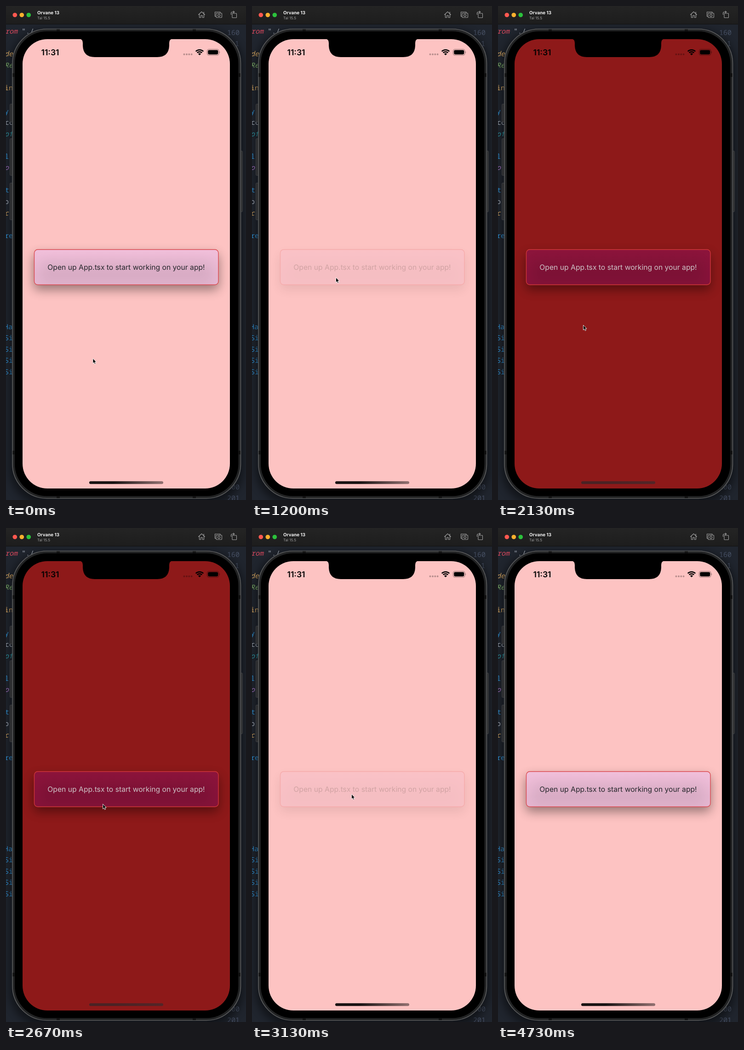
Recreate the animation shown at these times as an HTML page. Size 522 by 1073 pixels, loop 4.79 s.

```html
<!DOCTYPE html>
<html lang="en">
<head>
<meta charset="utf-8">
<title>Theme toggle</title>
<style>
html, body { margin: 0; height: 100%; overflow: hidden; background: #1e222a; }
svg {
  display: block; width: 100%; height: 100%;
  font-family: Inter, "Open Sans", sans-serif; text-rendering: geometricPrecision;
  --bg: #fdc3c2; --top: #f1bfda; --low: #e5b6d0; --tint: .05;
  --edge: #dc4a50; --ink: #25262b; --bar1: #181212; --bar2: #8f6e6e;
}
svg.dark {
  --bg: #8e1919; --top: #8c143b; --low: #87133a; --tint: .07;
  --edge: #d2363a; --ink: #cfc4c8; --bar1: #4a2224; --bar2: #532527;
}
#code { font: 15px "Noto Sans Mono", "DejaVu Sans Mono", monospace; }
.i { font-style: italic; }
.line { fill: none; stroke: #a2a2a2; stroke-width: 1.1; stroke-linejoin: round; stroke-linecap: round; }
</style>
</head>
<body>
<svg id="stage" viewBox="0 0 522 1073" preserveAspectRatio="none">
  <defs>
    <filter id="soft" x="-20%" y="-80%" width="140%" height="260%"><feGaussianBlur stdDeviation="11.6"/></filter>
    <filter id="glow" x="-10%" y="-10%" width="120%" height="120%"><feGaussianBlur stdDeviation="9"/></filter>
    <clipPath id="inside"><rect x="61" y="529" width="401" height="76.500" rx="8"/></clipPath>
    <linearGradient id="fill" x2="0" y2="1">
      <stop style="stop-color:var(--top)"/><stop offset=".7" style="stop-color:var(--low)"/>
    </linearGradient>
    <linearGradient id="bar" x2="1" y2=".04">
      <stop offset=".35" style="stop-color:var(--bar1)"/><stop offset="1" style="stop-color:var(--bar2)"/>
    </linearGradient>
    <linearGradient id="head" x2="0" y2="1">
      <stop stop-color="#242424"/><stop offset="1" stop-color="#1d1d1d"/>
    </linearGradient>
  </defs>

  <rect width="522" height="1073" fill="#20252e"/>
  <g id="code"></g>
  <rect x="8" y="52" width="508" height="1030" rx="76" opacity=".45" filter="url(#glow)"/>

  <!-- title bar -->
  <rect width="522" height="40" fill="url(#head)"/>
  <path d="M0 39.500H522" stroke="#111"/>
  <circle cx="19.300" cy="19.500" r="4.800" fill="#fe5850"/>
  <circle cx="34.300" cy="19.500" r="4.800" fill="#fbb02e"/>
  <circle cx="49.300" cy="19.500" r="4.800" fill="#2bc13c"/>
  <text x="68" y="18" font-size="9.800" font-weight="700" fill="#f2f2f2">Orvane 13</text>
  <text x="68" y="28.700" font-size="8" fill="#a0a0a0">Tal 15.5</text>
  <g class="line">
    <path d="M418.500 19L425.500 12.500L432.500 19M420.500 18V25H423.800V20.500H427.200V25H430.500V18M430.300 16V13"/>
    <path d="M456.500 22.500H454.500V13H466V15"/>
    <rect x="457" y="15.500" width="12.500" height="9.500" rx="1"/>
    <circle cx="463.200" cy="20.300" r="2.500"/>
    <rect x="492" y="16" width="9.500" height="9.500" rx=".8"/>
    <path d="M489.500 18.500V16Q489.500 13 492.500 13H496.500M494.500 11L496.700 13L494.500 15"/>
  </g>

  <!-- device -->
  <g fill="#2a2b2d" stroke="#45464a" stroke-width=".8">
    <rect x="8.500" y="213" width="8" height="39" rx="1.500"/>
    <rect x="8.500" y="288" width="8" height="80" rx="1.500"/>
    <rect x="8.500" y="384.500" width="8" height="80" rx="1.500"/>
    <rect x="506" y="315" width="8.500" height="132" rx="1.500"/>
  </g>
  <rect x="14" y="50" width="496.500" height="1019.500" rx="75" fill="#222324" stroke="#5e5f60" stroke-width="1.600"/>
  <path d="M110 52.500h7M406 52.500h7M110 1067h7M406 1067h7M16.500 146v8M508 146v8M16.500 966v8M508 966v8" stroke="#111" stroke-width="4"/>
  <rect x="19" y="55" width="486.500" height="1009.500" rx="70"/>
  <rect x="36" y="72" width="451" height="976" rx="54" style="fill:var(--bg)"/>
  <path d="M158 71.500H160Q167 72 167 80V86Q168 111 193 111H329Q354 111 355 86V80Q355 72 362 71.500H364Z"/>

  <!-- status bar -->
  <text x="96" y="107" font-size="17.600" font-weight="600" text-anchor="middle">11:31</text>
  <path d="M387.500 105h.01M393 105h.01M398.300 105h.01M403.600 105h.01" stroke="#000" stroke-opacity=".27" stroke-width="4" stroke-linecap="round"/>
  <g fill="none" stroke="#000" stroke-width="2.500">
    <path d="M412.800 98.600A11.800 11.800 0 0 1 429.200 98.600M415.700 101.600A7.700 7.700 0 0 1 426.300 101.600"/>
  </g>
  <path d="M421 107L417.900 103.900A4.500 4.500 0 0 1 424.100 103.900Z"/>
  <rect x="437.500" y="94" width="25.500" height="13" rx="4" fill="none" stroke="#000" stroke-opacity=".42" stroke-width="1.100"/>
  <rect x="439.300" y="95.800" width="21.900" height="9.400" rx="2.400"/>
  <path d="M464.300 98.300Q466.300 100.500 464.300 102.700Z" opacity=".45"/>

  <!-- button -->
  <g id="card">
    <rect x="61" y="539.500" width="401" height="76.500" rx="8" opacity=".4" filter="url(#soft)"/>
    <rect x="61.500" y="529" width="400.500" height="76.500" rx="8" fill="url(#fill)"/>
    <g clip-path="url(#inside)">
      <rect x="76" y="551" width="371" height="54" rx="8" style="opacity:var(--tint)" filter="url(#soft)"/>
    </g>
    <rect x="61.500" y="529" width="400.500" height="76.500" rx="7.500" fill="none" stroke-width="1.400" style="stroke:var(--edge)"/>
    <text x="261.500" y="573" font-size="15.700" text-anchor="middle" style="fill:var(--ink)">Open up App.tsx to start working on your app!</text>
  </g>
  <rect x="181" y="1032.300" width="161" height="6" rx="3" fill="url(#bar)"/>

  <path id="cursor" d="M0 0V10.800L2.400 8.600L4 12.300L5.900 11.500L4.300 7.900H7.500Z" stroke="#fff" stroke-width=".9"/>
</svg>
<script>
const $ = id => document.getElementById(id);
const blue = '#2f8fd0', grey = '#a9b0bb', gold = '#d9a860', dim = '#475064';

// text, x, baseline, colour, italic
[
  ['rom', -2, 60, '#d8485c', 1], ['"./', 34, 60, grey],
  ['de', -3, 109, gold, 1], ['Re', -3, 134, '#7fb069', 1], ['in', -3, 183, gold],
  ['y', -3, 234, blue], ['co', -2, 258, grey], ['of', -3, 283, '#2d9aa6', 1],
  ['l', -3, 332, blue], ['o', -3, 356, '#a873c4', 1], ['t', -2, 405, blue],
  ['p', -3, 430, grey], ['c', -3, 455, gold, 1], ['re', -3, 504, blue], ['Ha', -4, 702, blue],
  ...[726, 751, 775, 800].map(y => ['Si', -3, y, blue]),
  ['160', 481, 63, dim], ['1', 498, 87, dim], ['200', 481, 1050, dim], ['201', 481, 1074, dim]
].forEach(([s, x, y, fill, italic]) => {
  const el = document.createElementNS('http://www.w3.org/2000/svg', 'text');
  el.textContent = s;
  el.setAttribute('x', x);
  el.setAttribute('y', y);
  el.setAttribute('fill', fill);
  if (italic) el.setAttribute('class', 'i');
  $('code').append(el);
});

const LOOP = 4790, STEP = 200 / 3;
const presses = [[1000, 1266], [2870, 3132]];   // down, up
const path = [                                  // time, x, y of the pointer tip
  [0, 189, 765.5], [150, 189, 765.5], [950, 182.5, 590], [1400, 182.5, 589.5],
  [2050, 185.5, 693], [2250, 185.5, 693], [2850, 216.5, 578], [3450, 216.5, 578], [4200, 530, 700]
];

const ease = p => {
  p = Math.min(1, Math.max(0, p));
  return p < .5 ? 2 * p * p : 1 - 2 * (1 - p) ** 2;
};

function pointer(t) {
  const i = path.findIndex(k => k[0] > t);
  if (i < 0) return path.at(-1).slice(1);
  const [a, b] = [path[i - 1], path[i]], p = ease((t - a[0]) / (b[0] - a[0]));
  return [1, 2].map(n => a[n] + (b[n] - a[n]) * p);
}

function draw(now) {
  const t = Math.floor((now % LOOP + 4) / STEP) * STEP;
  const pressed = presses.reduce((sum, [down, up]) =>
    sum + ease((t - down) / 150) - ease((t - up) / 250), 0);
  $('card').setAttribute('opacity', 1 - .8 * pressed);
  $('stage').classList.toggle('dark', t >= presses[0][1] && t < presses[1][1]);
  $('cursor').setAttribute('transform', `translate(${pointer(t)})`);
}

const start = performance.now();
(function tick() {
  draw(performance.now() - start);
  requestAnimationFrame(tick);
})();
</script>
</body>
</html>
```
